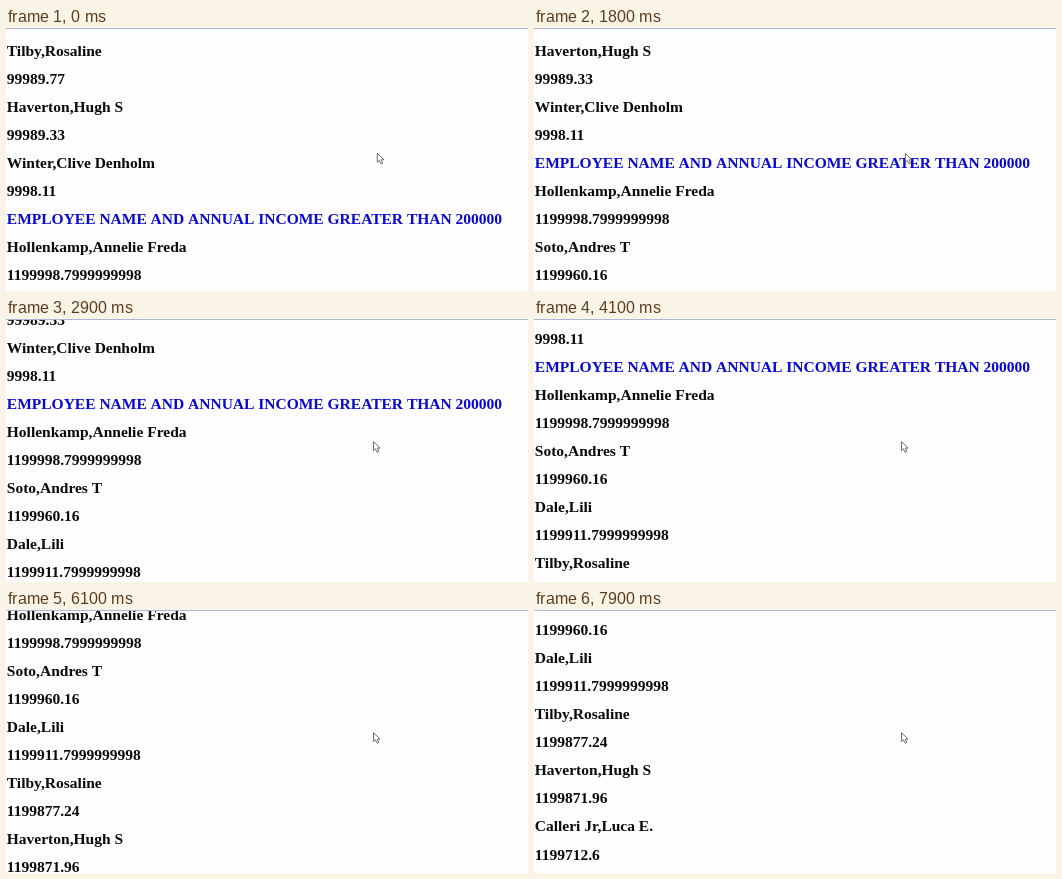
These frames come from a looping animation (522x263 px, 8 s). An HTML page with a canvas:

```html
<!DOCTYPE html>
<html lang="en">
<head>
<meta charset="utf-8">
<title>Income list</title>
<style>
html, body { margin: 0; width: 100%; height: 100%; overflow: hidden; background: #fefdff; }
canvas { display: block; }
</style>
</head>
<body>
<canvas id="stage" width="522" height="263"></canvas>
<script>
const W = 522, H = 263, LOOP = 8000;
const ctx = document.getElementById("stage").getContext("2d");

const HEADING = "EMPLOYEE NAME AND ANNUAL INCOME GREATER THAN 200000";
const rows = [
  "Tilby,Rosaline", "99989.77",
  "Haverton,Hugh S", "99989.33",
  "Winter,Clive Denholm", "9998.11",
  HEADING,
  "Hollenkamp,Annelie Freda", "1199998.7999999998",
  "Soto,Andres T", "1199960.16",
  "Dale,Lili", "1199911.7999999998",
  "Tilby,Rosaline", "1199877.24",
  "Haverton,Hugh S", "1199871.96",
  "Calleri Jr,Luca E.", "1199712.6"
];
const ROW_GAP = 28.05, FIRST_BASELINE = 27.8;

// Each wheel notch scrolls the page in a few visible steps.
const NOTCH = 17.7, STEP = 100;
const notches = [300, 800, 1300, 1800, 2200, 2700, 3200, 3700,
                 4100, 4700, 5200, 5600, 6100, 6600, 7200, 7700];
const eased = [0.1, 0.75, 1];
const shortEased = { 1800: [0.17, 1], 5200: [0.4, 1] };

function scrollAt(t) {
  let sum = 0;
  for (const start of notches) {
    if (t < start) break;
    const steps = shortEased[start] || eased;
    const i = Math.floor((t - start) / STEP);
    sum += steps[Math.min(i, steps.length - 1)];
  }
  return sum * NOTCH;
}

function pointerAt(t) {
  const k = Math.min(Math.max((Math.floor(t / STEP) * STEP - 2000) / 500, 0), 1);
  return [370.8 - 3.8 * k, 125 - 2.6 * k];
}

function drawPointer(x, y) {
  ctx.save();
  ctx.translate(x, y);
  ctx.beginPath();
  [[0.5, 0.3], [0.5, 9.2], [2.5, 7.4], [4.2, 10.9], [5.9, 10.1], [4.3, 6.8], [7.1, 6.7]]
    .forEach(([px, py]) => ctx.lineTo(px, py));
  ctx.closePath();
  ctx.fillStyle = "#fff";
  ctx.fill();
  ctx.lineWidth = 0.9;
  ctx.strokeStyle = "#5c5c64";
  ctx.stroke();
  ctx.restore();
}

function draw(t) {
  ctx.fillStyle = "#fefdff";
  ctx.fillRect(0, 0, W, H);
  ctx.font = 'bold 15.5px "Liberation Serif", "Times New Roman", serif';
  const top = FIRST_BASELINE - scrollAt(t);
  rows.forEach((text, i) => {
    const y = top + i * ROW_GAP;
    if (y < -6 || y > H + 14) return;
    ctx.fillStyle = text === HEADING ? "#0808d0" : "#0a0a0a";
    ctx.fillText(text, 0.8, y);
  });
  ctx.fillStyle = "#a9b9d2";
  ctx.fillRect(0, 0, W, 1);
  drawPointer(...pointerAt(t));
}

const began = performance.now();
function tick() {
  draw((performance.now() - began) % LOOP);
  requestAnimationFrame(tick);
}
tick();
</script>
</body>
</html>
```
